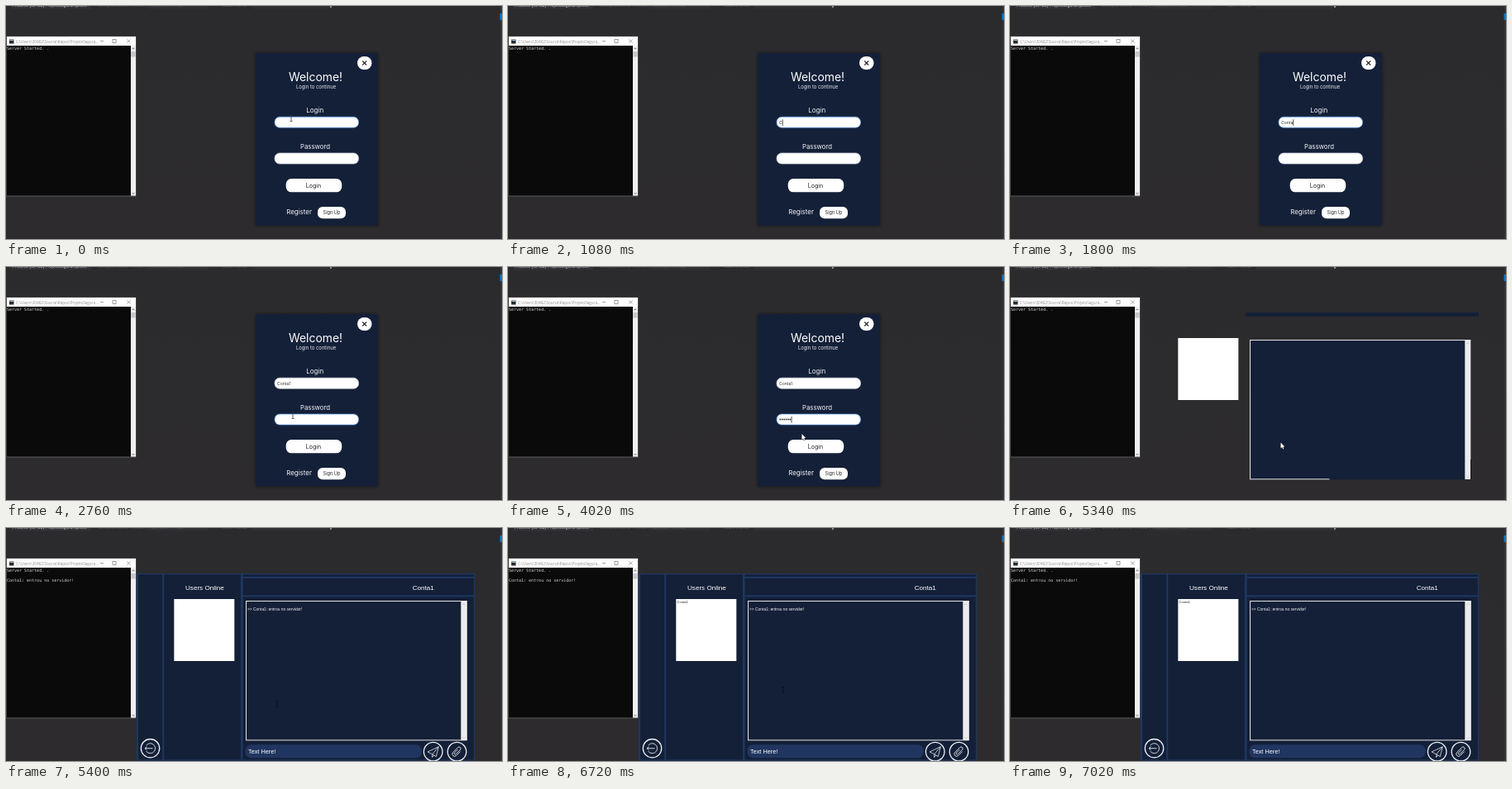
Recreate the animation shown at these times as an HTML page with a canvas. Size 600 by 282 pixels, loop 7.2 s.

```html
<!DOCTYPE html>
<html lang="pt">
<head>
<meta charset="utf-8">
<title>Login and chat</title>
<style>
html, body { margin: 0; width: 100%; height: 100%; overflow: hidden; background: #2c2b2e; }
canvas { display: block; }
</style>
</head>
<body>
<canvas id="stage" width="600" height="282"></canvas>
<script>
const ctx = document.getElementById('stage').getContext('2d');
const LOOP = 7200, TICK = 60, BLINK = 540;
const NAVY = '#142038', EDGE = '#1d3761', FOCUS = '#569de5';
const GEO = 'Inter, sans-serif';
const ARIAL = '"Liberation Sans", Arial, sans-serif';
const MONO = '"DejaVu Sans Mono", monospace';
const UI = '"Open Sans", sans-serif';
const USER = 'Conta1';
const JOINED = USER + ': entrou no servidor!';

const nameKeys = [1080, 1200, 1320, 1440, 1620, 1860];
const passKeys = [2940, 3120, 3180, 3420, 3540, 3840];
const CLICK_NAME = 300, CLICK_PASS = 2220, CLICK_LOGIN = 4320;
const FORM_END = 5340, CHAT_START = 5400, LISTED = 6000;

// time, x, y of the pointer
const pointerPath = [
  [0, 345, 136], [480, 345, 136], [720, 356, 140], [1860, 352, 150],
  [1980, 347, 180], [3840, 347, 180], [4140, 360, 214], [4320, 358, 217],
  [4620, 327.5, 212.5], [6660, 327.5, 212.5], [7020, 398, -14], [7200, 398, -14]
];

function rect(x, y, w, h, color) {
  ctx.fillStyle = color;
  ctx.fillRect(x, y, w, h);
}

function pill(x, y, w, h, r, fill, stroke) {
  ctx.beginPath();
  ctx.roundRect(x, y, w, h, r);
  ctx.fillStyle = fill;
  ctx.fill();
  if (stroke) {
    ctx.strokeStyle = stroke;
    ctx.lineWidth = 0.7;
    ctx.stroke();
  }
}

function text(str, x, y, size, family, color, align = 'left') {
  ctx.font = `${size}px ${family}`;
  ctx.fillStyle = color;
  ctx.textAlign = align;
  ctx.fillText(str, x, y);
}

function line(points, color, width = 1, close = false) {
  ctx.beginPath();
  points.forEach(([x, y]) => ctx.lineTo(x, y));
  if (close) ctx.closePath();
  ctx.strokeStyle = color;
  ctx.lineWidth = width;
  ctx.stroke();
}

function polygon(points, color) {
  ctx.beginPath();
  points.forEach(([x, y]) => ctx.lineTo(x, y));
  ctx.fillStyle = color;
  ctx.fill();
}

function cross(x, y, r, color, width) {
  line([[x - r, y - r], [x + r, y + r]], color, width);
  line([[x + r, y - r], [x - r, y + r]], color, width);
}

function pointerAt(t) {
  const i = pointerPath.findIndex(p => p[0] > t);
  const [t0, x0, y0] = pointerPath[i - 1], [t1, x1, y1] = pointerPath[i];
  const k = (t - t0) / (t1 - t0), e = k * k * (3 - 2 * k);
  return [x0 + (x1 - x0) * e, y0 + (y1 - y0) * e];
}

const typed = (keys, t) => keys.filter(k => k <= t).length;

function caretOn(keys, click, t) {
  const last = Math.max(click, ...keys.filter(k => k <= t));
  return Math.floor((t - last) / BLINK) % 2 === 0;
}

function drawDesktop() {
  const shade = ctx.createLinearGradient(0, 0, 0, 282);
  shade.addColorStop(0, '#2b2b2e');
  shade.addColorStop(1, '#2d2b2d');
  rect(0, 0, 600, 282, shade);
  rect(6, 0, 97, 3.5, '#333337');
  rect(172, 0, 73, 3.5, '#313134');
  rect(298, 0, 95, 3.5, '#313134');
  text('Process: [30482] ProjetoSegurança.exe', 8, 1, 5, UI, '#d5d5d5');
  text('Lifecycle Events', 112, 1, 5, UI, '#66666a');
  text('Thread: [4120] Main Thread', 150, 1, 5, UI, '#5a5a5e');
  text('Stack Frame:', 262, 1, 5, UI, '#66666a');
  rect(392, 0, 2, 2, '#8a8a8c');
  rect(598, 0, 2, 282, '#343438');
  rect(597.5, 9, 2.5, 8, '#0a7acc');
}

function drawConsole(joined) {
  rect(0.5, 36.5, 157, 194, '#5b5b5d');
  rect(1, 37, 156, 11, '#fff');
  rect(4, 40.5, 5.5, 5, '#2b2b2b');
  rect(4.5, 41, 4.5, 1, '#9ec3dc');
  text('C:\\Users\\30482\\Source\\Repos\\ProjetoSegura...', 12, 44.6, 4.6, UI, '#8f8f8f');
  line([[114, 42.5], [118, 42.5]], '#777', 0.7);
  ctx.strokeRect(129, 40.5, 4, 4);
  cross(148.5, 42.5, 2, '#777', 0.7);
  rect(1, 48, 150, 181.5, '#0a0a0b');
  rect(151, 48, 6, 181.5, '#efeff0');
  rect(151.3, 55, 5.4, 6.5, '#c8c8ca');
  line([[152.5, 52.3], [154, 50.8], [155.5, 52.3]], '#555', 0.8);
  line([[152.5, 226], [154, 227.5], [155.5, 226]], '#555', 0.8);
  text('Server Started. .', 1, 53.3, 5, MONO, '#d8d8d8');
  if (joined) text(JOINED, 1, 65.3, 5, MONO, '#d0d0d0');
}

function drawForm(t) {
  ctx.save();
  ctx.shadowColor = 'rgba(0,0,0,.5)';
  ctx.shadowBlur = 4;
  rect(302, 57, 147.5, 208.5, NAVY);
  ctx.restore();

  pill(425, 61, 17.5, 16, 8, '#fff');
  cross(433.7, 69, 2.5, '#303030', 1.2);
  text('Welcome!', 374.5, 91, 13.9, GEO, '#fff', 'center');
  text('Login to continue', 375, 100.3, 5.9, GEO, '#e8eaf0', 'center');
  text('Login', 373.7, 129, 8.1, GEO, '#f4f5f8', 'center');
  text('Password', 374, 172.7, 7.8, GEO, '#f4f5f8', 'center');

  const onName = t < CLICK_PASS;
  const onPass = !onName && t < CLICK_LOGIN;
  pill(325, 134.2, 101.5, 13, 6, '#fff', onName ? FOCUS : '#cfd3da');
  pill(325, 178, 101.5, 13, 6, '#fff', onPass ? FOCUS : '#cfd3da');

  const name = USER.slice(0, typed(nameKeys, t));
  text(name, 328, 143.2, 5.1, GEO, '#333');
  if (onName && t >= CLICK_NAME && caretOn(nameKeys, CLICK_NAME, t))
    rect(328 + ctx.measureText(name).width, 137.3, 0.8, 7.5, '#222');

  const dots = typed(passKeys, t);
  for (let i = 0; i < dots; i++) {
    ctx.beginPath();
    ctx.arc(329.3 + 2.4 * i, 184.5, 0.9, 0, 7);
    ctx.fillStyle = '#333';
    ctx.fill();
  }
  if (onPass && caretOn(passKeys, CLICK_PASS, t))
    rect(328.2 + 2.4 * dots, 181, 0.8, 7.5, '#222');

  pill(338.7, 209, 67.5, 16.3, 6.5, t >= 4140 ? '#969696' : '#fff');
  text('Login', 372, 219.6, 7, GEO, '#222', 'center');
  text('Register', 339.3, 252, 7.9, GEO, '#f4f5f8');
  pill(377, 243, 34, 14.2, 6, '#fff');
  text('Sign Up', 394, 252.2, 5.6, GEO, '#222', 'center');
}

function ring(x, y, r) {
  ctx.beginPath();
  ctx.arc(x, y, r, 0, 7);
  ctx.strokeStyle = '#eef0f4';
  ctx.lineWidth = 1.3;
  ctx.stroke();
}

function drawIcons() {
  const ink = '#e4e7ee';
  ring(174.5, 266.7, 11.2);
  ctx.beginPath();
  ctx.arc(174.5, 266.7, 6, -2.5, 2.5);
  ctx.strokeStyle = ink;
  ctx.lineWidth = 0.9;
  ctx.stroke();
  line([[177.5, 266.7], [168, 266.7]], ink, 0.9);
  line([[170.5, 264.5], [168, 266.7], [170.5, 268.9]], ink, 0.9);

  ring(516.7, 270.7, 11.3);
  line([[510, 271], [523.3, 264.7], [520.3, 276.7], [515.8, 273.8]], ink, 0.8, true);
  line([[515.8, 273.8], [523.3, 264.7]], ink, 0.8);
  line([[515.8, 273.8], [515.5, 277.5], [517.8, 275.2]], ink, 0.8);

  ring(545.5, 270.7, 11.3);
  ctx.save();
  ctx.translate(545.5, 270.7);
  ctx.rotate(Math.PI / 4);
  ctx.beginPath();
  ctx.moveTo(2.8, -3);
  ctx.lineTo(2.8, 4);
  ctx.arc(0, 4, 2.8, 0, Math.PI);
  ctx.lineTo(-2.8, -4.5);
  ctx.arc(-0.8, -4.5, 2, Math.PI, 0);
  ctx.lineTo(1.2, 3);
  ctx.arc(0, 3, 1.2, 0, Math.PI);
  ctx.lineTo(-1.2, -2.5);
  ctx.strokeStyle = ink;
  ctx.lineWidth = 0.9;
  ctx.stroke();
  ctx.restore();
}

function drawChatBox(ready) {
  rect(203.3, 86, 73, 75, '#fff');
  rect(290, 88, 267.5, 169.3, NAVY);
  rect(550.3, 89, 7, 168, '#ececee');
  line([[552.4, 93], [553.8, 91.6], [555.2, 93]], '#b8b8ba', 0.7);
  line([[552.4, 253.5], [553.8, 254.9], [555.2, 253.5]], '#b8b8ba', 0.7);
  rect(290, 88, 267.5, 1, '#e4e4e2');
  rect(290, 88, 1, 169, '#e4e4e2');
  rect(290, 256.3, ready ? 267.5 : 96.5, 1, '#e4e4e2');
  if (ready) rect(557, 88, 0.8, 169, '#e4e4e2');
  else rect(557, 233, 1, 24, '#111419');
}

function drawChat(t) {
  rect(158, 55, 409, 226.5, NAVY);
  rect(158, 55, 409, 1.3, EDGE);
  rect(158, 55, 2, 226.5, EDGE);
  rect(189.2, 56, 2, 225, EDGE);
  rect(284, 56, 2.6, 225, EDGE);
  rect(285, 59, 282, 1.8, EDGE);
  rect(285, 81.3, 282, 2, EDGE);
  rect(565.8, 56, 1.3, 225, EDGE);
  rect(158, 280.4, 409, 1.1, EDGE);
  text('Users Online', 217, 74.7, 8.1, ARIAL, '#fff');
  text(USER, 504.7, 74.7, 8.1, ARIAL, '#fff', 'center');
  drawChatBox(true);
  text('>> ' + JOINED, 292, 100.3, 4.9, ARIAL, '#f2f3f6');
  if (t >= LISTED) text(USER, 204.6, 91, 4.1, ARIAL, '#222');
  pill(289.5, 262.3, 213, 16, 7, '#203660');
  text('Text Here!', 293, 273.2, 7.3, ARIAL, '#fff');
  drawIcons();
}

function drawIBeam(x, y, color) {
  rect(x - 0.4, y - 3.5, 0.8, 7, color);
  rect(x - 1.5, y - 3.8, 3, 0.7, color);
  rect(x - 1.5, y + 3.1, 3, 0.7, color);
}

function drawArrow(x, y) {
  const shape = [[0, 0], [0, 7], [1.6, 5.6], [2.7, 8], [3.7, 7.5], [2.7, 5.2], [4.8, 5]]
    .map(([dx, dy]) => [x + dx, y + dy]);
  line(shape, '#111', 0.9, true);
  polygon(shape, '#fff');
}

function drawPointer(t) {
  const typing = (t >= 1080 && t < 1920) || (t >= 2940 && t < 3900);
  if (typing) return;
  const [x, y] = pointerAt(t);
  if (t >= CHAT_START) {
    if (y > 88) drawIBeam(x, y, '#080c16');
    else drawArrow(x, y);
    return;
  }
  const inField = x > 325 && x < 427 && ((y > 133 && y < 148) || (y > 177 && y < 192));
  if (inField) drawIBeam(x, y, '#333');
  else drawArrow(x, y);
}

function draw(t) {
  drawDesktop();
  if (t < FORM_END) {
    drawForm(t);
  } else if (t < CHAT_START) {
    rect(285, 55, 282, 4.8, NAVY);
    drawChatBox(false);
  } else {
    drawChat(t);
  }
  drawConsole(t >= CHAT_START);
  drawPointer(t);
}

const start = performance.now();
function frame() {
  const t = (performance.now() - start) % LOOP;
  draw(Math.floor(t / TICK) * TICK);
  requestAnimationFrame(frame);
}
frame();
</script>
</body>
</html>
```
